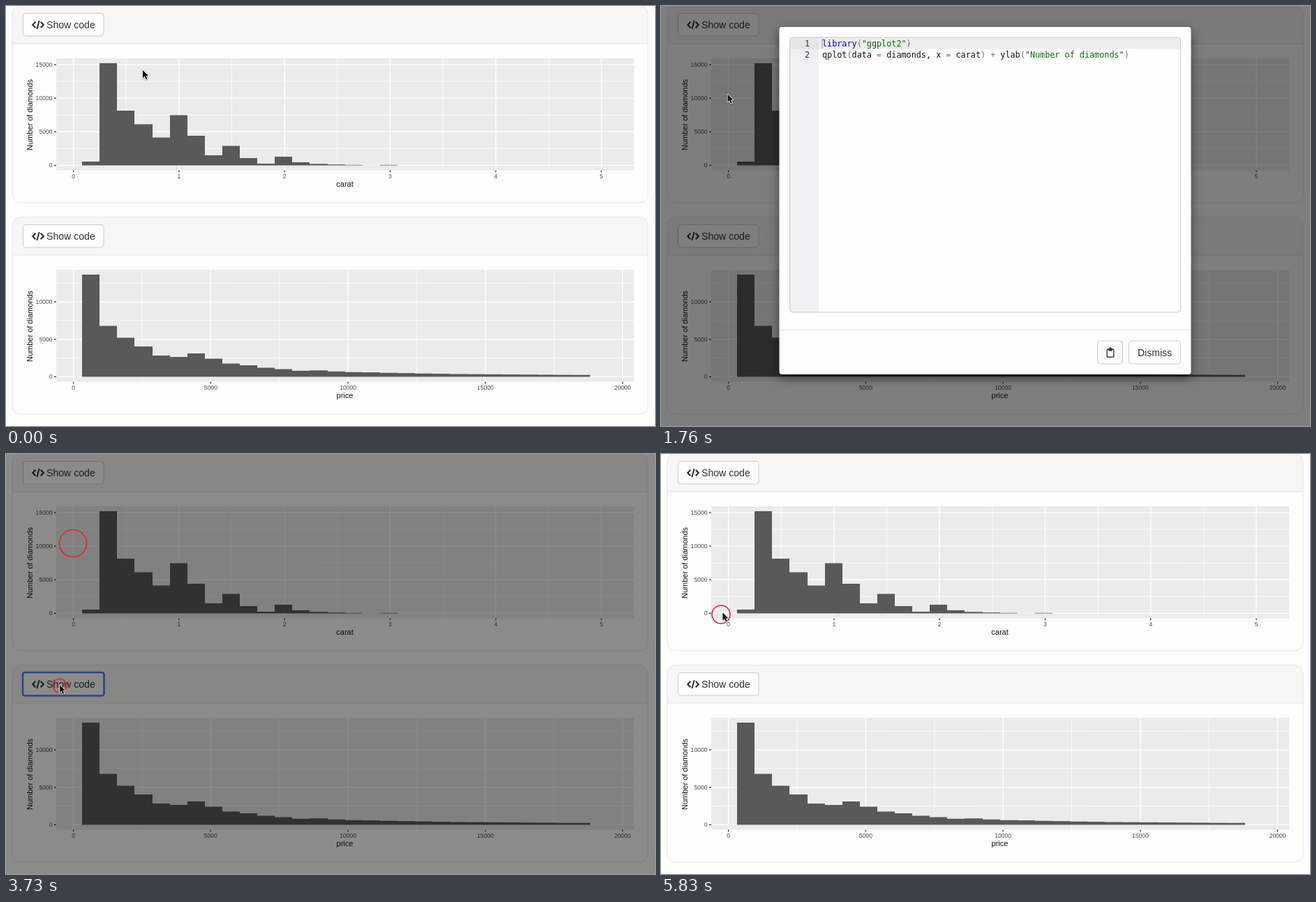
These frames come from a looping animation (930 px wide and 602 px high, 5860 ms). An HTML page with a canvas:

```html
<!DOCTYPE html>
<html>
<head>
<meta charset="utf-8">
<title>Show code</title>
<style>
html, body { margin: 0; width: 100%; height: 100%; overflow: hidden; background: #fefefd; }
canvas { display: block; }
</style>
</head>
<body>
<canvas id="stage" width="930" height="602"></canvas>
<script>
const g = document.getElementById('stage').getContext('2d');
const LOOP = 5860;
const SANS = '"Liberation Sans", Arial, sans-serif';
const MONO = '"DejaVu Sans Mono", monospace';
const BIN = 25.1;

const charts = [
  { top: 0, label: 'carat', xStep: 151.3, xUnit: 1, yStep: 48.15,
    bars: [5.5, 146.5, 78.5, 59, 40, 72, 42.5, 14.5, 28, 10.5, 2.5, 12.5, 4.5, 2.2, 1.3, .7, .1, .7] },
  { top: 303, label: 'price', xStep: 196.75, xUnit: 5000, yStep: 53.7,
    bars: [146.5, 73, 56, 43.5, 30.5, 28.5, 33.5, 26, 19, 16.5, 13, 11, 8.7, 9.2, 7.7, 6.7, 6.4, 5.7, 5.3,
      4.8, 4.4, 4, 3.8, 3.6, 3.4, 3.2, 3, 2.8, 2.7] }
];

// Each visit: button pressed, backdrop opens, click outside closes
const visits = [
  { press: 480, open: 694, close: 2540, name: 'carat' },
  { press: 3420, open: 3594, close: 5360, name: 'price' }
];
const clicks = [[480, 125, 32], [2495, 96, 128], [3420, 77, 332], [5280, 86, 230]];
const path = [
  [100, 196, 92], [470, 125, 31], [1300, 125, 31], [1740, 95.5, 126.5], [2460, 95.5, 126.5], [2500, 96, 128.5],
  [2930, 96, 128.5], [3400, 77, 331], [4860, 77, 331], [5060, 85.5, 228.5], [5400, 85.5, 228.5], [5800, 88.5, 227.5]
];

const clamp = v => Math.max(0, Math.min(1, v));
const easeOut = p => 1 - (1 - p) ** 2;
const smooth = p => p * p * (3 - 2 * p);

function rect(x, y, w, h, fill) {
  g.fillStyle = fill;
  g.fillRect(x, y, w, h);
}

function round(x, y, w, h, r, fill, stroke, width = 1) {
  g.beginPath();
  g.roundRect(x, y, w, h, r);
  if (fill) { g.fillStyle = fill; g.fill(); }
  if (stroke) { g.strokeStyle = stroke; g.lineWidth = width; g.stroke(); }
}

function line(points, color, width) {
  g.beginPath();
  points.forEach(([x, y]) => g.lineTo(x, y));
  g.strokeStyle = color;
  g.lineWidth = width;
  g.stroke();
}

function text(str, x, y, size, color, align = 'left', family = SANS) {
  g.font = `${size}px ${family}`;
  g.textAlign = align;
  g.fillStyle = color;
  g.fillText(str, x, y);
}

function showButton(hover, focus) {
  round(24.5, 10.5, 115.5, 32.5, 4, hover ? '#e6e6e6' : '#fefefe', hover ? '#adadad' : '#ccc');
  if (focus) round(24, 10, 116.5, 33.5, 3, null, '#4b80f5', 2.6);
  line([[42.3, 22.7], [38.3, 27], [42.3, 31.3]], '#333', 2.2);
  line([[47.6, 21], [44.4, 33]], '#333', 2);
  line([[49.7, 22.7], [53.7, 27], [49.7, 31.3]], '#333', 2.2);
  text('Show code', 58, 32, 14.1, '#333');
}

function gridLines(c, offset, width) {
  for (let x = 96.6 + offset * c.xStep; x < 900; x += c.xStep) line([[x, 75], [x, 235.5]], '#fff', width);
  for (let y = 228.4 - offset * c.yStep; y > 76; y -= c.yStep) line([[72, y], [900, y]], '#fff', width);
}

function card(c, hover, focus) {
  g.save();
  g.translate(0, c.top);
  round(9, -.5, 911, 282.5, 12, '#fefefd', null);
  round(9, -.5, 911, 54.5, [12, 12, 0, 0], '#f6f6f5');
  rect(9, 53.5, 911, 1, '#e4e4e4');
  round(9, -.5, 911, 282.5, 12, null, '#e6e6e6');
  showButton(hover, focus);

  rect(72, 75, 828, 160.5, '#ebebec');
  gridLines(c, .5, .7);
  gridLines(c, 0, 1.4);
  c.bars.forEach((h, i) => {
    const left = Math.round(109.1 + i * BIN), right = Math.round(109.1 + (i + 1) * BIN);
    rect(left, 228.5 - h, right - left, h, '#59595a');
  });

  for (let i = 0, x = 96.6; x < 900; x += c.xStep, i++) {
    line([[x, 235.5], [x, 238.3]], '#333', 1.2);
    text(i * c.xUnit, x, 247, 8.6, '#4d4d4d', 'center');
  }
  for (let i = 0, y = 228.4; y > 76; y -= c.yStep, i++) {
    line([[69, y], [72, y]], '#333', 1.2);
    text(i * 5000, 66.5, y + 3, 8.6, '#4d4d4d', 'right');
  }
  text(c.label, 485.5, 259, 11, '#111', 'center');
  g.translate(37.5, 156);
  g.rotate(-Math.PI / 2);
  text('Number of diamonds', 0, 0, 11, '#111', 'center');
  g.restore();
}

function codeLine(y, parts) {
  let x = 231;
  for (const [str, color] of parts) {
    text(str, x, y, 11.79, color, 'left', MONO);
    x += g.measureText(str).width;
  }
}

function modal(name) {
  g.save();
  g.shadowColor = 'rgba(0,0,0,.5)';
  g.shadowBlur = 15;
  g.shadowOffsetY = 5;
  round(169.5, 30, 590, 498, 4, '#fefefe');
  g.restore();

  rect(185, 45, 41, 394, '#f0f0f2');
  rect(185, 45, 41, 16.5, '#e5e5e7');
  rect(226, 45, 518.5, 16.5, '#eeeeec');
  round(184.5, 45, 560, 394, 4, null, '#ccc');
  text('1', 213, 57.5, 11.79, '#333', 'right', MONO);
  text('2', 213, 73.5, 11.79, '#333', 'right', MONO);

  const plain = '#111', op = '#687687', str = '#036a07', word = '#0000f0';
  rect(230.5, 46, 1, 15, '#999');
  codeLine(57.5, [['library', word], ['(', op], ['"ggplot2"', str], [')', op]]);
  codeLine(73.5, [['qplot', plain], ['(', op], ['data ', plain], ['= ', op], ['diamonds, x ', plain], ['= ', op],
    [name, plain], [') + ', op], ['ylab', plain], ['(', op], ['"Number of diamonds"', str], [')', op]]);

  rect(170, 464, 589, 1, '#e5e5e5');
  round(625.5, 480, 36, 33, 4, '#fefefe', '#ccc');
  round(670.5, 480, 74, 33, 4, '#fefefe', '#ccc');
  text('Dismiss', 707.5, 502, 14, '#333', 'center');
  round(639.2, 492, 9.6, 11.2, 1, null, '#333', 1.4);
  round(641.2, 490.5, 5.6, 4, 1, '#333');
  round(642.7, 489.3, 2.6, 3, 1.3, '#333');
}

function pointer(x, y) {
  const shape = [[0, 0], [0, 11.2], [2.6, 8.8], [4.5, 13], [6.4, 12.2], [4.6, 8.1], [8, 8]];
  g.save();
  g.translate(x, y);
  g.beginPath();
  shape.forEach(([px, py]) => g.lineTo(px, py));
  g.closePath();
  g.lineJoin = 'round';
  g.shadowColor = 'rgba(0,0,0,.3)';
  g.shadowBlur = 2;
  g.shadowOffsetY = 1;
  g.strokeStyle = '#f4f4f4';
  g.lineWidth = 1.6;
  g.stroke();
  g.shadowColor = 'transparent';
  g.fillStyle = '#111';
  g.fill();
  g.restore();
}

function pointerAt(t) {
  const i = path.findIndex(k => k[0] > t);
  if (i < 1) return path[i ? path.length - 1 : 0].slice(1);
  const [t0, x0, y0] = path[i - 1], [t1, x1, y1] = path[i];
  const p = smooth((t - t0) / (t1 - t0));
  return [x0 + (x1 - x0) * p, y0 + (y1 - y0) * p];
}

function draw(t) {
  const [mx, my] = pointerAt(t);
  const shades = visits.map(v => Math.min(clamp((t - v.open) / 150), 1 - clamp((t - v.close - 150) / 150)));
  const shade = Math.max(...shades);

  rect(0, 0, 930, 602, '#fefefd');
  charts.forEach((c, i) => {
    const over = mx > 24 && mx < 140 && my > c.top + 10 && my < c.top + 43;
    const v = visits[i];
    card(c, over && !shade, t >= v.press && t < v.open + 150);
  });

  rect(0, 0, 930, 602, `rgba(0,0,0,${shade / 2})`);
  for (const v of visits) {
    const start = v.open + 150;
    const leaving = t >= v.close;
    const alpha = leaving ? 1 - clamp((t - v.close) / 150) : clamp((t - start) / 150);
    if (!alpha) continue;
    const slide = leaving ? easeOut(clamp((t - v.close) / 300)) : 1 - easeOut(clamp((t - start) / 300));
    g.save();
    g.globalAlpha = alpha;
    g.translate(0, -124.5 * slide);
    modal(v.name);
    g.restore();
  }

  for (const [start, x, y] of clicks) {
    const age = t - start;
    if (age <= 0 || age >= 1240) continue;
    g.beginPath();
    g.arc(x, y, .555 * Math.sqrt(age), 0, 7);
    g.strokeStyle = '#f51c24';
    g.lineWidth = 1.5;
    g.stroke();
  }
  pointer(mx, my);
}

const begin = performance.now();
function tick() {
  draw((performance.now() - begin) % LOOP);
  requestAnimationFrame(tick);
}
tick();
</script>
</body>
</html>
```
